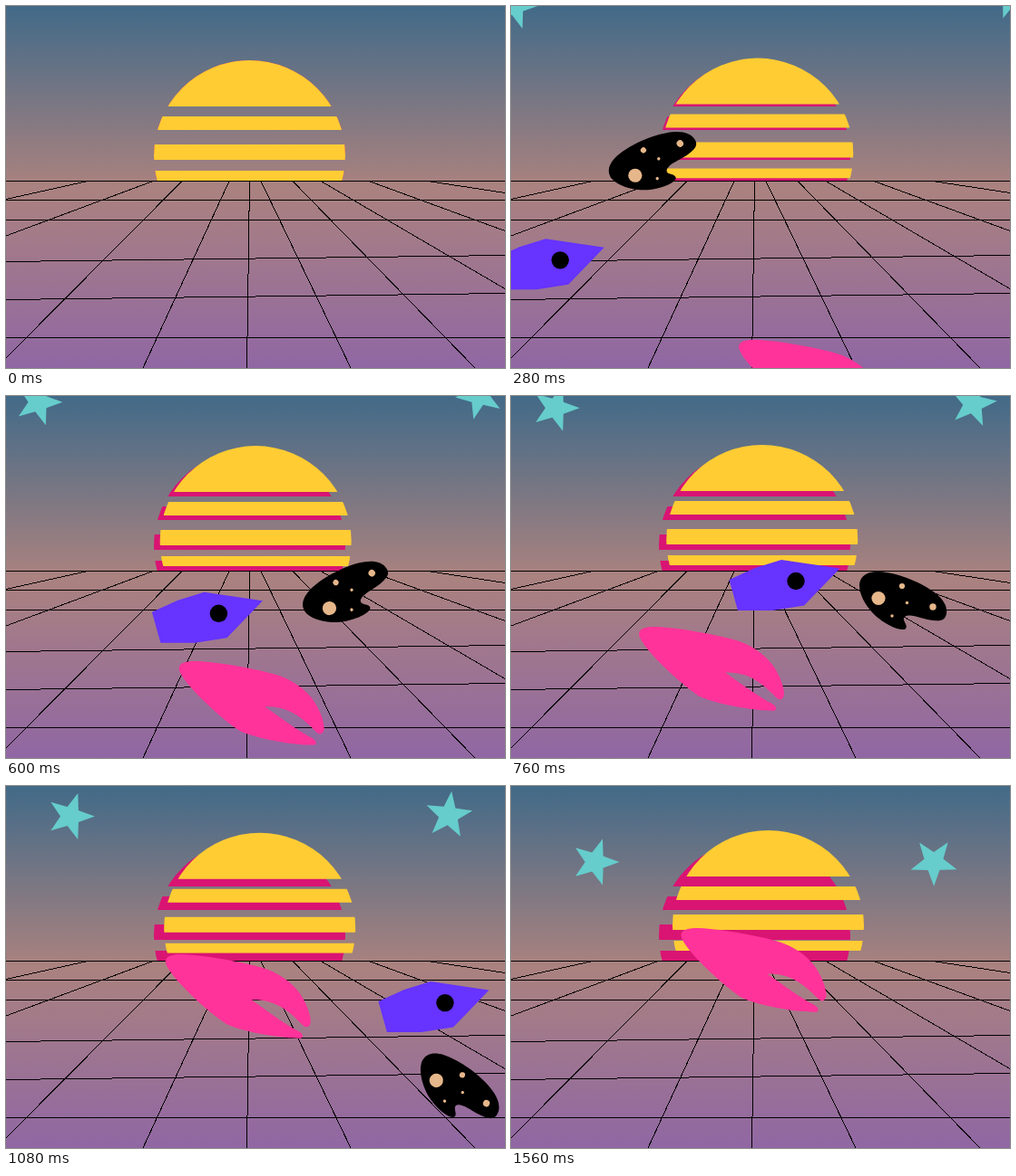
An HTML page for the animation above (1.64 s loop, 550 by 400 pixels).

```html
<!DOCTYPE html>
<html lang="en">
<head>
<meta charset="utf-8">
<title>Sunset grid</title>
<style>
  html, body { margin: 0; width: 100%; height: 100%; overflow: hidden; }
  svg { display: block; width: 550px; height: 400px; }
</style>
</head>
<body>
<svg viewBox="0 0 550 400">
  <defs>
    <linearGradient id="sky" x1="0" y1="0" x2="0" y2="1">
      <stop offset="0" stop-color="#426a88"/>
      <stop offset=".5" stop-color="#aa827f"/>
      <stop offset="1" stop-color="#9067a3"/>
    </linearGradient>
    <clipPath id="slats">
      <path d="M150 50h240v61H150zM150 122h240v15H150zM150 153h240v17H150zM150 182h240v11H150z"/>
    </clipPath>
    <circle id="disc" cx="268.5" cy="165.5" r="105.5" clip-path="url(#slats)"/>
  </defs>
  <rect width="550" height="400" fill="url(#sky)"/>
  <path fill="none" stroke="#000" shape-rendering="crispEdges"
    d="M0 194L550 193M0 214.5H550M0 236.5H550M0 282.5L550 275.5M0 324.5L550 317.5M0 366.5H550
       M90 193.5L0 213.5M162 193.5L0 254M194 193.5L0 389M246 193.5L151 400M268.5 193.5L265.5 400
       M281 193.5L380 400M316 193.5L517 400M347 193.5L550 312.5M400 193.5L550 248.5M465 193.5L550 206.5"/>
  <use href="#disc" fill="#d91473"/>
  <use href="#disc" fill="#fc3" id="sun"/>
  <polygon id="starL" fill="#6cc"/>
  <polygon id="starR" fill="#6cc"/>
  <path id="claw" fill="#f39"
    d="M141 263C141 256 150 255 160 255C186 256 222 263 245 269C267 275 281 287 289 298
       C297 310 301 322 301 330C300 336 296 337 292 333C281 322 264 304 236 305.5
       C250 315 266 328 284 338C291 341 294 345 291 347.5C278 349 229 342 208 332
       C185 317 141 275 141 263Z"/>
  <g id="bird">
    <path fill="#63f" d="M-73.5 -1.5L-45 -14.5L-16 -23.5L48.5 -14L9 27L-26 32.5H-64Z"/>
    <circle r="9.7"/>
  </g>
  <g id="rock">
    <path d="M-48 -15C-47 -27 -37 -30 -27 -30C-4 -29 24 -16 36 -6C46 2 49 10 48 16
             C47 23 43 25 34 24C22 23 14 18 6 18.5C0 19 0 22 2 26C5 31 4 34 0 34
             C-10 34 -26 24 -34 15C-42 6 -48 -5 -48 -15Z"/>
    <g fill="#e6b78a">
      <circle cx="-27" cy="-.5" r="7.6"/>
      <circle cx="-1" cy="-14" r="3.1"/>
      <circle cx="33" cy="9" r="3.7"/>
      <circle cx="4.5" cy="4.5" r="1.7"/>
      <circle cx="-12" cy="19" r="1.7"/>
    </g>
  </g>
</svg>
<script>
const LOOP = 1640, STEP = 40, LAST = 1560;
const el = id => document.getElementById(id);
const lerp = (a, b, p) => a + (b - a) * p;
const easeOut = (p, k) => p + k * p * (1 - p);

// Key poses of the flying shapes: x, y, turn
const times = [0, 440, 760, 960, 1240, LAST];
const flights = {
  claw: [[105, 180], [100, 76], [0, 0], [33, -46], [32.5, -92], [46.5, -98]],
  bird: [[-116, 281], [148, 272.5], [314, 204.5], [398, 197], [611, 313], [850, 440]],
  rock: [[-110, 90, 50], [289, 205, -76], [432, 224, 0], [475.5, 295.5, 28], [532.7, 381.3, -10], [600, 480, -40]]
};

// Smooth curve through one coordinate of the key poses
function glide(keys, axis, t) {
  const n = keys.length - 1;
  const i = Math.max(0, times.findLastIndex((at, k) => k < n && at <= t));
  const slope = k => {
    const a = Math.max(k - 1, 0), b = Math.min(k + 1, n);
    return (keys[b][axis] - keys[a][axis]) / (times[b] - times[a]);
  };
  const d = times[i + 1] - times[i], p = (t - times[i]) / d, q = 1 - p;
  return q * q * (1 + 2 * p) * keys[i][axis] + p * p * (3 - 2 * p) * keys[i + 1][axis]
    + d * p * q * (q * slope(i) - p * slope(i + 1));
}

function place(id, x, y, turn = 0) {
  el(id).setAttribute('transform', `translate(${x} ${y}) rotate(${turn})`);
}

function draw(t) {
  const p = t / LAST, rise = easeOut(p, .25);
  place('sun', 15 * rise, -11 * rise);
  place('starL', lerp(-28, 92.7, easeOut(p, .6)), lerp(-2, 84, p ** 2.4));
  place('starR', lerp(581, 466, easeOut(p, .55)), lerp(-15, 84, p ** 2), .21 * (t - 790));
  for (const [id, keys] of Object.entries(flights))
    place(id, ...keys[0].map((_, axis) => glide(keys, axis, t)));
}

const star = Array.from({ length: 10 }, (_, i) => {
  const a = i * Math.PI / 5, r = i % 2 ? 11 : 26.8;
  return [r * Math.cos(a), r * Math.sin(a)];
}).join(' ');
for (const id of ['starL', 'starR']) el(id).setAttribute('points', star);

const start = performance.now();
function tick() {
  const t = (performance.now() - start) % LOOP;
  draw(Math.min(Math.floor(t / STEP) * STEP, LAST));
  requestAnimationFrame(tick);
}
tick();
</script>
</body>
</html>
```
